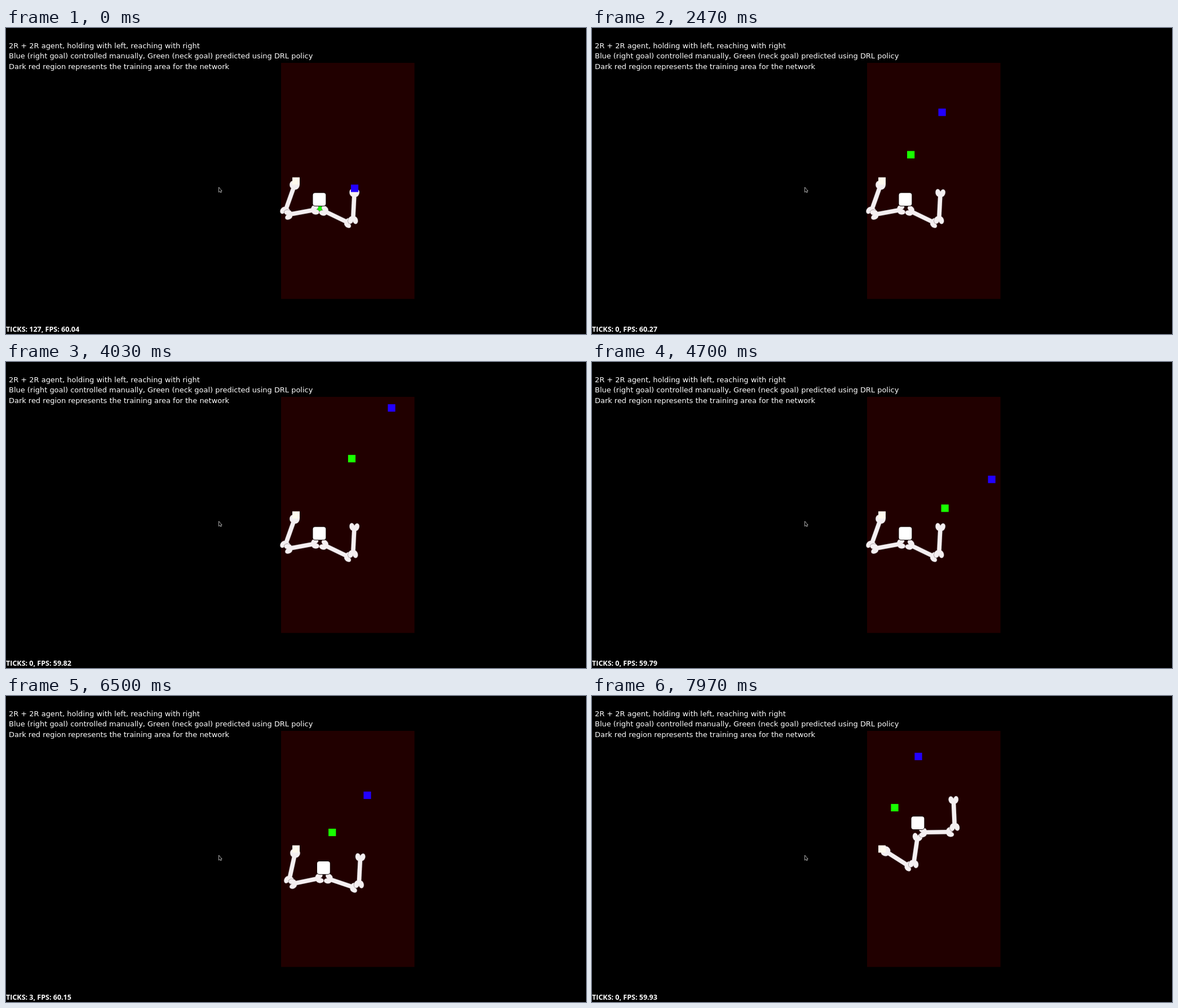
Recreate the animation shown at these times as an HTML page. Size 1029 by 544 pixels, loop 8 s.

```html
<!DOCTYPE html>
<html lang="en">
<head>
<meta charset="utf-8">
<title>Two-arm reaching agent</title>
<style>
html, body { margin: 0; width: 100%; height: 100%; overflow: hidden; background: #000; }
svg { display: block; width: 100%; height: 100%; }
.note { font: 12.96px "DejaVu Sans", sans-serif; fill: #fff; }
.stats { font: 700 12.5px "Open Sans", sans-serif; fill: #fff; }
</style>
</head>
<body>
<svg viewBox="0 0 1029 544">
  <defs>
    <g id="end">
      <ellipse cx="8.3" cy="-4" rx="6.6" ry="4.5" transform="rotate(14 8.3 -4)"/>
      <ellipse cx="8.3" cy="4" rx="6.6" ry="4.5" transform="rotate(-14 8.3 4)"/>
    </g>
    <g id="shape">
      <rect x="9" y="-3.7" width="47" height="7.4"/>
      <use href="#end"/>
      <use href="#end" transform="translate(65) scale(-1 1)"/>
    </g>
    <g id="bone">
      <use href="#shape" fill="#6c5e60" stroke="#6c5e60" stroke-opacity=".6" stroke-width="1.4"/>
      <use href="#shape" fill="#f4eff1"/>
    </g>
  </defs>
  <rect width="1029" height="544" fill="#000"/>
  <rect x="488" y="62" width="236.7" height="419.7" fill="#210000"/>
  <g class="note">
    <text x="5" y="36">2R + 2R agent, holding with left, reaching with right</text>
    <text x="5" y="54">Blue (right goal) controlled manually, Green (neck goal) predicted using DRL policy</text>
    <text x="5" y="73">Dark red region represents the training area for the network</text>
  </g>
  <rect id="green" x="-6.6" y="-6.6" width="13.2" height="13.2" fill="#18ff00"/>
  <use class="limb" href="#bone"/>
  <use class="limb" href="#bone"/>
  <use class="limb" href="#bone"/>
  <use class="limb" href="#bone"/>
  <rect id="head" x="-11.4" y="-11.4" width="22.8" height="22.8" rx="4" fill="#fff" stroke="#120808" stroke-width="2" paint-order="stroke"/>
  <rect x="508" y="265.5" width="13" height="13" fill="#fffaee"/>
  <rect id="blue" x="-6.6" y="-6.6" width="13.2" height="13.2" fill="#2200ff"/>
  <path d="M377.5 283v9l2-1.6 1.4 2.4 1.3-.7-1.2-2.4h2.2z" fill="#000" stroke="#bbb" stroke-width=".9"/>
  <text class="stats" id="stats" x="0" y="540"></text>
</svg>
<script>
const LOOP = 8000, LINK = 65, TICK = 1000 / 60;
const STEER = 1290, GO = 6450, REST = 7290;  // goal moves, arms start, goal moves again
const SPEED = 7 / 50;                        // joint speed, degrees per ms
const HOLD = [514.5, 272];                   // fixed left hand
const $ = id => document.getElementById(id);
const limbs = document.querySelectorAll(".limb");

// turning points of the steered goal: time, x, y
const turns = [
  [STEER, 618.5, 285], [1900, 636, 190], [2470, 621, 150], [3150, 705, 78],
  [4030, 684, 81.5], [4650, 716, 190], [5330, 624.7, 439.5], [5900, 710, 310],
  [6390, 641, 176.5], [REST, 641, 176.5], [7550, 632, 122], [7970, 579, 107.5]
];

function handGoal(t) {
  const i = turns.findIndex(p => p[0] > t);
  if (i < 1) return (i ? turns.at(-1) : turns[0]).slice(1);
  const [t0, x, y] = turns[i - 1], [t1, u, v] = turns[i], k = (t - t0) / (t1 - t0);
  return [x + (u - x) * k, y + (v - y) * k];
}

// smooth stand-in for the learned policy
function neckGoal([x, y]) {
  const dx = x - 579, dy = y - 107.5;
  return [537 + .72 * dx - .035 * dy - .0001 * dy * dy, 198.5 + .71 * dy - .08 * dx];
}

const rad = a => a * Math.PI / 180, deg = a => a * 180 / Math.PI;
const along = ([x, y], a) => [x + LINK * Math.cos(rad(a)), y + LINK * Math.sin(rad(a))];

// joint angles [first, second relative to first], elbow hanging below
function reach([x, y], [u, v]) {
  const dx = u - x, dy = v - y;
  const bend = deg(Math.acos(Math.hypot(dx, dy) / 2 / LINK));
  return [deg(Math.atan2(dy, dx)) + bend, -2 * bend];
}

const pose = (neck, hand) => [...reach(HOLD, neck), ...reach(neck, hand)];
const from = pose([556.7, 321.6], handGoal(0));
const to = pose(neckGoal(handGoal(GO)), handGoal(GO));

function put(el, [x, y], turn = 0) {
  el.setAttribute("transform", `translate(${x.toFixed(2)} ${y.toFixed(2)}) rotate(${turn.toFixed(2)})`);
}

function draw(t) {
  const goal = handGoal(t);
  put($("blue"), goal);
  put($("green"), neckGoal(goal));

  // every joint turns at the same speed until it arrives
  const step = Math.max(0, t - GO) * SPEED;
  const q = from.map((a, i) => a + Math.max(-step, Math.min(step, to[i] - a)));
  const left = along(HOLD, q[0]), neck = along(left, q[0] + q[1]), right = along(neck, q[2]);
  put(limbs[0], HOLD, q[0]);
  put(limbs[1], left, q[0] + q[1]);
  put(limbs[2], neck, q[2]);
  put(limbs[3], right, q[2] + q[3]);
  put($("head"), [neck[0] - .8, neck[1] - 16.9]);

  const ticks = t < STEER ? 127 : t >= GO && t < REST ? Math.floor((t - GO) / TICK + .01) : 0;
  const n = Math.floor(t / TICK / 10);
  const fps = 60.04 + .25 * Math.sin(n * n);
  $("stats").textContent = `TICKS: ${ticks}, FPS: ${fps.toFixed(2)}`;
}

const start = performance.now();
function frame(now) {
  draw(Math.max(0, now - start) % LOOP);
  requestAnimationFrame(frame);
}
draw(0);
requestAnimationFrame(frame);
</script>
</body>
</html>
```
